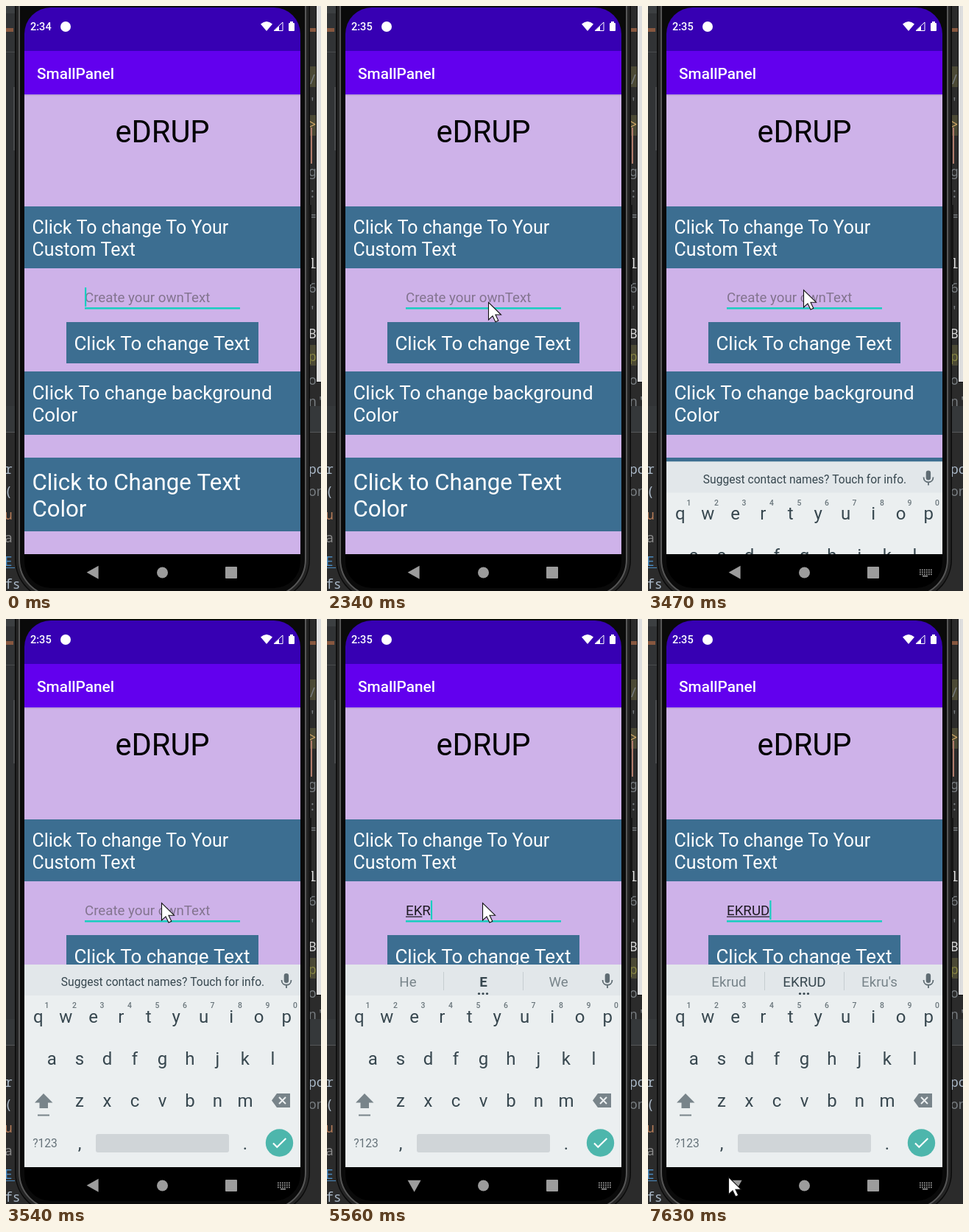
An HTML page with a canvas for the animation above (7.99 s loop, 428 by 794 pixels).

```html
<!DOCTYPE html>
<html lang="en">
<head>
<meta charset="utf-8">
<title>Custom text demo</title>
<style>
  html, body { margin: 0; width: 100%; height: 100%; overflow: hidden; background: #2b2b2b; }
  canvas { display: block; width: 428px; height: 794px; }
</style>
</head>
<body>
<canvas id="stage" width="428" height="794"></canvas>
<script>
const ctx = document.getElementById('stage').getContext('2d');
const LOOP = 7990;
const SANS = 'Roboto, sans-serif', MONO = '"Noto Sans Mono", monospace';
const TEAL = '#18cec0', BLUE = '#3c6e91', INK = '#37474f', GREY = '#78848a', NAV = '#9c9c9c';

// Timelines: each entry holds from its time until the next one.
const typed = [[0, ''], [3960, 'E'], [5340, 'EK'], [5560, 'EKR'], [5970, 'EKRU'], [6340, 'EKRUD']];
const underlined = [[0, 0], [4130, 1], [5450, 2], [5760, 3], [6080, 4], [6450, 5]];
const caretOn = [[0, 1], [120, 0], [620, 1], [1130, 0], [1610, 1], [2140, 0], [2610, 1], [3160, 0],
  [3960, 1], [4590, 0], [5120, 1], [6870, 0], [7380, 1]];
const suggestions = [[0, null], [4130, ['He', 'E', 'We']], [5610, ['Eke', 'EK', 'Ekes']],
  [5760, ['Eke', 'EKR', 'Ekra']], [6080, ['Ekru', 'EKRU', 'Ekra']], [6450, ['Ekrud', 'EKRUD', "Ekru's"]]];
// Pointer path: time, x, y
const pointer = [[380, 360, 743], [650, 291, 575], [910, 270, 505], [1130, 262, 477], [1350, 234, 429],
  [2140, 234, 429], [2340, 219, 402], [2460, 217, 384], [2610, 217, 384], [2740, 222, 368],
  [2980, 211, 385], [6870, 211, 385], [7100, 238, 490], [7330, 205, 635], [7630, 109, 757]];

const valueAt = (line, t) => line.findLast(step => step[0] <= t)[1];
const progress = (t, from, to) => Math.min(1, Math.max(0, (t - from) / (to - from)));

function pointerAt(t) {
  const next = pointer.findIndex(p => p[0] > t);
  if (next < 0) return pointer.at(-1).slice(1);
  const [t0, x0, y0] = pointer[next - 1], [t1, x1, y1] = pointer[next];
  const k = progress(t, t0, t1);
  return [x0 + (x1 - x0) * k, y0 + (y1 - y0) * k];
}

function rect(x, y, w, h, color, radius = 0) {
  ctx.fillStyle = color;
  ctx.beginPath();
  ctx.roundRect(x, y, w, h, radius);
  ctx.fill();
}

function disc(x, y, r, color) {
  ctx.fillStyle = color;
  ctx.beginPath();
  ctx.arc(x, y, r, 0, Math.PI * 2);
  ctx.fill();
}

function text(str, x, y, size, color, align = 'left', weight = 400, family = SANS) {
  ctx.font = `${weight} ${size}px ${family}`;
  ctx.textAlign = align;
  ctx.fillStyle = color;
  ctx.fillText(str, x, y);
}

function shape(path, fill, stroke, width = 1) {
  const p = new Path2D(path);
  if (fill) { ctx.fillStyle = fill; ctx.fill(p); }
  if (stroke) { ctx.strokeStyle = stroke; ctx.lineWidth = width; ctx.stroke(p); }
}

function editorBackdrop() {
  rect(0, 0, 428, 794, '#2b2b2b');
  rect(0, 0, 13, 543, '#313335');
  rect(0, 0, 13, 10, '#3c3f41');
  rect(0, 30, 10, 5, '#87573f');
  rect(0, 62, 13, 1, '#4a4c4e');
  rect(10, 110, 2, 86, '#494b4d');
  rect(0, 543, 428, 36, '#35383a');
  rect(0, 578, 428, 1, '#555759');
  [82, 148, 460].forEach(y => rect(413, y, 9, 28, '#4b4935'));
  rect(413, 30, 8, 5, '#87573f');
  const code = (s, x, y, color = '#a9b7c6') => text(s, x, y, 18, color, 'left', 400, MONO);
  [['r', 635], ['(', 665], ['u', 697, '#b57b58'], ['a', 728, '#8a8a8a'], ['E', 760, '#4a8ac0'], ['fs', 791]]
    .forEach(([s, y, color]) => code(s, -2, y, color));
  rect(0, 762, 12, 1, '#4a8ac0');
  [['/', 106], ["'", 137], ['>', 167, '#d0a768'], ['g', 231], [':', 260], ['=', 291], ['l', 356, '#d5d5d5'],
    ['6', 389], ["'", 420], ['B', 451, '#d5d5d5'], ['p', 482, '#858343'], ['o', 514], ["n'", 543],
    ['po', 635, '#a9b7c6'], ['on', 665]]
    .forEach(([s, y, color = '#777c80']) => code(s, 411, y, color));
  rect(414, 165, 2, 49, '#b17c6c');
  rect(421, 0, 7, 511, '#111');
  rect(422, 0, 6, 510, '#dedede');
}

function phoneBody() {
  rect(12, -60, 401, 867, '#0a0a0a', 56);
  const rim = (inset, width, color) => {
    ctx.strokeStyle = color;
    ctx.lineWidth = width;
    ctx.beginPath();
    ctx.roundRect(12 + inset, -60, 401 - 2 * inset, 867 - inset, 56 - inset);
    ctx.stroke();
  };
  rim(4, 5, '#242424');
  rim(6, 2, '#565656');
  rect(412, 270, 3, 108, '#141414');
}

function statusBar(t) {
  rect(25, 0, 375, 61, '#3700b3');
  text(t < 600 ? '2:34' : '2:35', 33, 33, 14.56, '#fff', 'left', 500);
  disc(81, 28, 7, '#fff');
  shape('M346 24.5 Q354 17.5 362 24.5 L354 34 Z', '#fff');
  shape('M364 33.5 L376 22 V33.5 Z', null, '#fff', 1);
  shape('M364 34 L371 27.2 V34 Z', '#fff');
  rect(384, 23, 8, 11, '#fff', 1);
  rect(386, 21, 4, 3, '#fff');
}

function appPage(t) {
  rect(25, 61, 375, 683, '#ceb2e9');
  rect(25, 61, 375, 59, '#6200ee');
  rect(25, 120, 375, 2, 'rgba(0,0,0,.08)');
  text('SmallPanel', 42, 99, 20.8, '#fff', 'left', 500);
  text('eDRUP', 212.5, 185, 41.6, '#000', 'center');
  const button = (x, y, w, h, size, ...lines) => {
    rect(x, y, w, h, BLUE);
    lines.forEach(([str, baseline]) => text(str, x + 10.4, baseline, size, '#fff'));
  };
  button(25, 272, 375, 84, 24.96, ['Click To change To Your', 309], ['Custom Text', 338.5]);
  button(82, 429, 261, 56, 26, ['Click To change Text', 467]);
  button(25, 496, 375, 86, 26, ['Click To change background', 533.5], ['Color', 564]);
  button(25, 613, 375, 100, 31.2, ['Click to Change Text', 656.5], ['Color', 693.3]);
  inputField(t);
}

function inputField(t) {
  const value = valueAt(typed, t);
  rect(107, 409, 211, 2.4, TEAL);
  text(value || 'Create your ownText', 107, 402, 18.72, value ? '#1e1a22' : '#83748f');
  const widthOf = str => ctx.measureText(str).width;
  rect(107, 403.5, widthOf(value.slice(0, valueAt(underlined, t))), 1.2, '#1e1a22');
  if (valueAt(caretOn, t)) rect(107 + widthOf(value), 382, 2.2, 26, TEAL);
}

function suggestionStrip(t) {
  rect(25, 469, 375, 42, '#e2e7ea');
  const words = valueAt(suggestions, t);
  if (words) {
    words.forEach((word, i) => {
      const middle = i === 1;
      text(word, [110, 212.5, 314.5][i], 499, 18.72, middle ? INK : GREY, 'center', word === 'E' ? 700 : 400);
    });
    rect(158, 479, 1, 25, '#c6cdd1');
    rect(266, 479, 1, 25, '#c6cdd1');
    [206.5, 212, 217.5].forEach(x => disc(x, 508.5, 1.6, INK));
  } else {
    text('Suggest contact names? Touch for info.', 213, 498, 15.6, INK, 'center');
  }
  rect(377.7, 481, 6.4, 13, '#5f6c73', 3.2);
  shape('M374.5 490 C374.5 499 387.5 499 387.5 490 M381 497 V501', null, '#5f6c73', 1.8);
}

function keyboard(t) {
  const slide = 1 - progress(t, 3450, 3530);
  ctx.save();
  ctx.beginPath();
  ctx.rect(25, 469, 375, 275);
  ctx.clip();
  ctx.translate(0, 275 * slide * slide);
  rect(25, 469, 375, 275, '#ebeff0');
  suggestionStrip(t);
  ['qwertyuiop', 'asdfghjkl', 'zxcvbnm'].forEach((row, r) => {
    [...row].forEach((key, i) =>
      text(key, [43.7, 62.4, 100][r] + i * 37.5, 547.5 + r * 57.3, 24, INK, 'center'));
  });
  [...'1234567890'].forEach((digit, i) => text(digit, 55.5 + i * 37.5, 528, 10.4, '#69757b', 'center', 500));
  shape('M51 644 L63.5 656.5 H57 V664 H45.5 V656.5 H39 Z', GREY);
  rect(43, 672.5, 16, 2, GREY);
  shape('M361 653.5 L368 644 H386 V663 H368 Z', GREY);
  shape('M371 649 L380 658 M380 649 L371 658', null, '#ebeff0', 2);
  text('?123', 53, 717, 15.6, '#66737a', 'center');
  text(',', 100, 720, 24, INK, 'center');
  rect(122, 699, 181, 25, '#d0d5d8', 3);
  text('.', 325, 720, 24, INK, 'center');
  disc(371.5, 711, 18.7, '#4db6ac');
  shape('M363 711.5 L368.3 716.8 L380.3 705', null, '#fff', 2.1);
  ctx.restore();
}

function navBar(t) {
  rect(25, 744, 375, 50, '#000');
  ctx.save();
  ctx.translate(118.6, 768.8);
  ctx.rotate(-Math.PI / 2 * progress(t, 3550, 3810));
  shape('M-9 0 L7 -9 V9 Z', NAV);
  ctx.restore();
  disc(212.5, 769, 7.5, NAV);
  rect(298, 761, 16, 16, NAV, 1);
  if (t < 3270) return;
  for (let row = 0; row < 3; row++)
    for (let x = 369; x < 385; x += 3) rect(x, 764.5 + row * 3, 1.7, 1.7, NAV);
  rect(373, 773, 7, 1.5, NAV);
}

function mouse(t) {
  if (t < pointer[0][0]) return;
  ctx.save();
  ctx.translate(...pointerAt(t));
  shape('M.5 .5 V24 L6 18.8 L10 27 L13.8 25.2 L10 17.2 H17.5 Z', '#fff', '#111', 1.1);
  ctx.restore();
}

function draw(t) {
  editorBackdrop();
  phoneBody();
  ctx.save();
  ctx.beginPath();
  ctx.roundRect(25, 2, 375, 788, 36);
  ctx.clip();
  statusBar(t);
  appPage(t);
  if (t >= 3450) keyboard(t);
  navBar(t);
  ctx.restore();
  mouse(t);
}

const start = performance.now();
function frame() {
  draw((performance.now() - start) % LOOP);
  requestAnimationFrame(frame);
}
frame();
</script>
</body>
</html>
```
